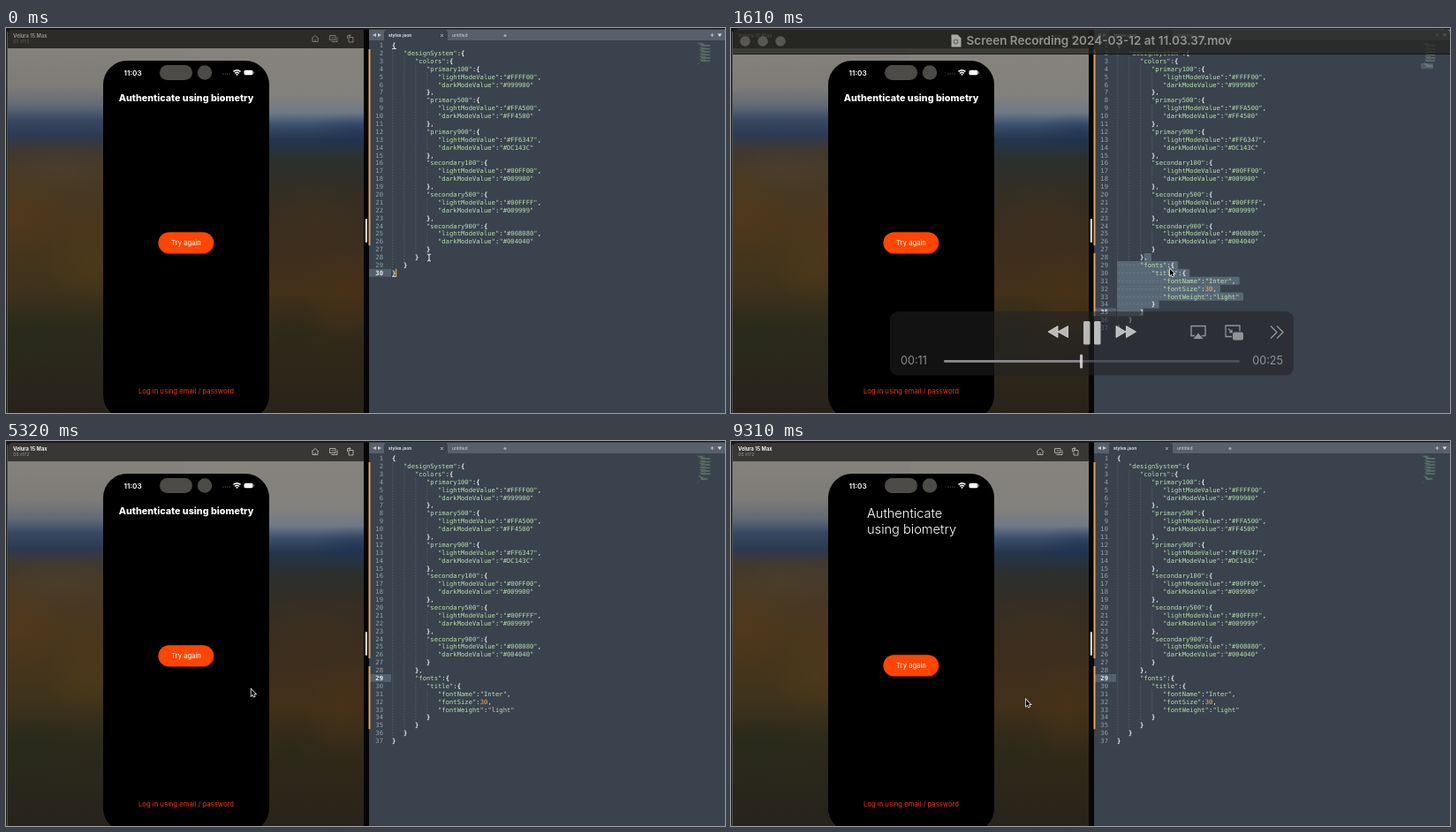
Animation of 814x436 px, one loop 9380 ms. Source, as an HTML page with a canvas:

```html
<!DOCTYPE html>
<html lang="en">
<head>
<meta charset="utf-8">
<title>Design tokens demo</title>
<style>
  html, body { margin: 0; width: 100%; height: 100%; overflow: hidden; background: #191917; }
  canvas { display: block; }
</style>
</head>
<body>
<canvas id="stage" width="814" height="436"></canvas>
<script>
const ctx = document.getElementById('stage').getContext('2d', { alpha: false });
const LOOP = 9380, STEP = 70;
const SANS = 'Inter, sans-serif', MONO = '"DejaVu Sans Mono", monospace';
const CHAR = 4.335, LINE = 8.89, CODE_X = 437, CODE_Y = 19.5;

// Times of the hard changes and fades, in ms
const PASTE = 420, DESELECT = 2170, FOCUS_SIMULATOR = 4340, RELOAD = 8190;
const OVERLAY = { from: 490, shown: 700, fade: 1500, gone: 1900 };
const MOUSE = [
  [0, 479, 260], [1190, 480, 262], [1610, 498, 274], [2240, 498, 271], [2660, 470, 271], [3430, 314, 267],
  [4200, 314, 267], [5250, 278, 282], [5880, 296, 291], [6440, 332, 297], [7560, 335, 294]
];

// ---------- helpers ----------
const clamp = v => Math.max(0, Math.min(1, v));
const ramp = (t, a, b) => clamp((t - a) / (b - a));
const ease = v => v * v * (3 - 2 * v);

function rect(x, y, w, h, color, radius = 0) {
  ctx.fillStyle = color;
  ctx.beginPath();
  ctx.roundRect(x, y, w, h, radius);
  ctx.fill();
}
function disc(x, y, r, color) {
  ctx.fillStyle = color;
  ctx.beginPath();
  ctx.arc(x, y, r, 0, 7);
  ctx.fill();
}
function text(str, x, y, font, color, align = 'left') {
  ctx.font = font;
  ctx.fillStyle = color;
  ctx.textAlign = align;
  ctx.fillText(str, x, y);
}
function path(d, x, y, stroke, width = 1, fill) {
  const p = new Path2D(d);
  ctx.save();
  ctx.translate(x, y);
  if (stroke) { ctx.strokeStyle = stroke; ctx.lineWidth = width; ctx.stroke(p); }
  if (fill) { ctx.fillStyle = fill; ctx.fill(p); }
  ctx.restore();
}
function mousePosition(t) {
  const next = MOUSE.findIndex(k => k[0] > t);
  if (next < 0) return MOUSE.at(-1).slice(1);
  const [t0, x0, y0] = MOUSE[next - 1], [t1, x1, y1] = MOUSE[next];
  const k = ease((t - t0) / (t1 - t0));
  return [x0 + (x1 - x0) * k, y0 + (y1 - y0) * k];
}

// ---------- code ----------
const indent = (depth, str) => ' '.repeat(depth * 3) + str;
const PALETTE = [
  ['primary100', '#FFFF00', '#999900'], ['primary500', '#FFA500', '#FF4500'], ['primary900', '#FF6347', '#DC143C'],
  ['secondary100', '#00FF00', '#009900'], ['secondary500', '#00FFFF', '#009999'], ['secondary900', '#008080', '#004040']
];
const HEAD = [
  '{', indent(1, '"designSystem":{'), indent(2, '"colors":{'),
  ...PALETTE.flatMap(([name, light, dark], i) => [
    indent(3, `"${name}":{`), indent(4, `"lightModeValue":"${light}",`),
    indent(4, `"darkModeValue":"${dark}"`), indent(3, i < 5 ? '},' : '}')
  ])
];
const TAIL = [indent(1, '}'), '}'];
const BEFORE = [...HEAD, indent(2, '}'), ...TAIL];
const AFTER = [
  ...HEAD, indent(2, '},'), indent(2, '"fonts":{'), indent(3, '"title":{'),
  indent(4, '"fontName":"Inter",'), indent(4, '"fontSize":30,'), indent(4, '"fontWeight":"light"'),
  indent(3, '}'), indent(2, '}'), ...TAIL
];
const rowTop = line => CODE_Y + (line - 1) * LINE - LINE / 2;
const depthOf = line => line.search(/\S/);

function drawToken(token, x, y) {
  const brace = /[{}]/.test(token);
  const color = token[0] === '"' ? '#bbdfb1' : /\d/.test(token) ? '#f3ae62' : '#f2f4f5';
  text(token, x, y, `${brace ? 'bold ' : ''}7.2px ${MONO}`, color);
}
function drawSelection(lines) {
  for (let n = 28; n <= 35; n++) {
    const from = n === 28 ? 467.5 : CODE_X;
    const end = CODE_X + (lines[n - 1].length + (n < 35 ? 1 : 0)) * CHAR;
    rect(from, rowTop(n), end - from, LINE + .2, '#596876', 1.5);
    if (n > 28) text('·'.repeat(depthOf(lines[n - 1])), CODE_X, rowTop(n) + 7, `7.2px ${MONO}`, '#7c8994');
  }
}
function drawMinimap(lines, selected) {
  lines.forEach((line, i) => {
    const start = depthOf(line), y = 16 + i * .86;
    rect(782 + start * .4, y, (line.length - start) * .4, .55, '#8fb69099');
    if (selected && i > 27 && i < 35) rect(781, y, 14, .86, '#8d9aa655');
  });
}
function drawEditor(t) {
  const pasted = t >= PASTE, selected = pasted && t < DESELECT;
  const lines = pasted ? AFTER : BEFORE;
  const active = !pasted ? 30 : selected ? 35 : 29;

  rect(411, 1, 403, 435, '#39424d');
  rect(411, 2, 403, 12, '#58616b');
  rect(428, 2, 72, 13, '#39424d', [3, 3, 0, 0]);
  path('M4 -2L0 0L4 2ZM6 -2L10 0L6 2Z', 415, 8, null, 1, '#c5cacf');
  text('styles.json', 433, 10, `600 5px ${SANS}`, '#eef0f2');
  text('untitled', 505, 10, `5px ${SANS}`, '#d3d7db');
  path('M-1.5 -1.5L1.5 1.5M1.5 -1.5L-1.5 1.5', 493.5, 8.5, '#cbd0d5', .8);
  disc(565, 8.5, 1.6, '#a0a7ae');
  path('M-2 0H2M0 -2V2', 799.5, 8, '#c9cdd2', .8);
  path('M-2.5 -1.5H2.5L0 2Z', 808, 8, null, 1, '#d9dde1');

  rect(411, rowTop(active), 25, LINE, '#53606d');
  rect(410.5, rowTop(2), 2, LINE * 25, '#e2a35c');
  if (pasted) rect(410.5, rowTop(28), 2, LINE * 8, '#e2a35c');
  if (selected) drawSelection(lines);

  lines.forEach((line, i) => {
    const n = i + 1, y = rowTop(n) + 7.05, start = depthOf(line);
    text(n, 427, y, `${n === active ? 'bold ' : ''}7.2px ${MONO}`, n === active ? '#e9edf0' : '#99a3ad', 'right');
    for (let c = 0; c < start; c += 3)
      for (let dy = 0; dy < 8; dy += 3) rect(CODE_X + .5 + c * CHAR, rowTop(n) + dy, .7, 1.5, '#606d79');
    for (const m of line.matchAll(/"[^"]*"|\d+|[{}]|[:,]/g)) drawToken(m[0], CODE_X + m.index * CHAR, y);
  });

  if (t < FOCUS_SIMULATOR && !selected) {
    const brackets = pasted ? [[498, 29], [463, 35]] : [[437, 1], [437, 30]];
    brackets.forEach(([x, n]) => rect(x, rowTop(n) + 8, 5, .9, '#dce1e5'));
    rect(pasted ? 498 : 441, rowTop(active), 1.2, LINE, '#f5a552');
  }
  drawMinimap(lines, selected);
}

// ---------- simulator ----------
function verticalWash(x, w, stops) {
  const g = ctx.createLinearGradient(0, 23, 0, 436);
  stops.forEach(([y, color]) => g.addColorStop((y - 23) / 413, color));
  ctx.fillStyle = g;
  ctx.fillRect(x, 23, w, 413);
}
function glow(x, y, rx, ry, rgb, alpha) {
  ctx.save();
  ctx.translate(x, y);
  ctx.scale(rx, ry);
  const g = ctx.createRadialGradient(0, 0, 0, 0, 0, 1);
  g.addColorStop(0, `rgba(${rgb},${alpha})`);
  g.addColorStop(1, `rgba(${rgb},0)`);
  ctx.fillStyle = g;
  ctx.fillRect(-1, -1, 2, 2);
  ctx.restore();
}
function drawWallpaper() {
  ctx.save();
  ctx.beginPath();
  ctx.rect(2, 23, 403, 413);
  ctx.clip();
  verticalWash(2, 200, [[23, '#85827b'], [66, '#7e7c78'], [88, '#626a76'], [104, '#384862'], [122, '#2c3a50'],
    [140, '#41392f'], [160, '#463a28'], [220, '#4a361d'], [290, '#40331b'], [340, '#2c2a1b'], [436, '#27231b']]);
  verticalWash(202, 203, [[23, '#86837d'], [76, '#83817d'], [96, '#6f7986'], [110, '#3c4f6b'], [126, '#23364e'],
    [148, '#2b302f'], [180, '#332e25'], [235, '#3c2e1e'], [300, '#423019'], [360, '#302919'], [436, '#28241a']]);
  glow(10, 205, 60, 55, '92,60,22', .35);
  glow(60, 160, 60, 28, '84,70,44', .3);
  glow(95, 265, 50, 50, '88,64,24', .4);
  glow(30, 350, 70, 45, '38,42,28', .5);
  glow(395, 118, 50, 22, '22,44,78', .4);
  glow(350, 215, 50, 40, '72,52,30', .3);
  glow(380, 300, 45, 55, '84,54,22', .3);
  glow(320, 350, 50, 50, '36,40,26', .45);
  ctx.restore();
}
function drawPhone(t) {
  rect(110, 37, 188, 406, '#000', 27);
  text('11:03', 133.5, 53.6, `600 8.2px ${SANS}`, '#fff');
  rect(174, 42, 37, 17, '#4c4b47', 8.5);
  disc(225, 50.5, 8.2, '#4c4b47');
  for (let i = 0; i < 4; i++) disc(246 + i * 2.4, 52, .6, '#777');
  path('M-4 -1.6Q0 -5 4 -1.6M-2.4 .4Q0 -1.8 2.4 .4', 261.5, 51, '#fff', 1.4);
  disc(261.5, 52.7, 1, '#fff');
  rect(269.5, 47.8, 10, 5.4, '#fff', 1.6);
  rect(280.2, 49.5, .9, 2, '#999');

  const reloaded = t >= RELOAD;
  if (reloaded) {
    text('Authenticate', 154, 87, `300 14.6px ${SANS}`, '#fff');
    text('using biometry', 154, 104.5, `300 14.6px ${SANS}`, '#fff');
  } else {
    text('Authenticate using biometry', 204, 82.8, `800 10.75px ${SANS}`, '#fff', 'center');
  }
  const top = reloaded ? 242.3 : 231.3;
  rect(172.5, top + .5, 63.5, 24.5, '#4a1808', 12.25);
  rect(172.5, top, 62.5, 24, '#fe4602', 12);
  text('Try again', 204, top + 15, `7.7px ${SANS}`, '#fff', 'center');
  text('Log in using email / password', 204, 413.6, `7.7px ${SANS}`, '#f4361a', 'center');
}
function drawSimulator(t) {
  const focused = t >= FOCUS_SIMULATOR;
  drawWallpaper();
  rect(2, 2, 403, 21, focused ? '#383735' : '#2d2b27', [5, 0, 0, 0]);
  text('Velura 15 Max', 8, 11.3, `700 5.7px ${SANS}`, focused ? '#f0f0f0' : '#8e8c87');
  text('OS v17.2', 8, 17.3, `4.6px ${SANS}`, focused ? '#a5a4a0' : '#6b6964');
  const icon = focused ? '#b8b7b4' : '#84827d';
  path('M-4 0L0 -3.5L4 0M-3 -.5V3.5H3V-.5M0 3.5V1', 350, 12, icon, .9);
  path('M-4 -3.5H2.5V1.5H-4ZM-2 3.5H4.5V-1.5M-2 -1H1', 370.5, 12, icon, .9);
  path('M-2 -1.5H3V4H-2ZM-3.5 0V-3.5H0M-1.5 -5L0 -3.5L-1.5 -2', 390, 12, icon, .9);
  drawPhone(t);
}

// ---------- player overlay ----------
function drawOverlay(t) {
  const alpha = ramp(t, OVERLAY.from, OVERLAY.shown) * (1 - ease(ramp(t, OVERLAY.fade, OVERLAY.gone)));
  if (!alpha) return;
  ctx.save();
  ctx.globalAlpha = alpha;

  rect(2, 1, 812, 28.5, 'rgba(37,36,33,.92)', [6, 6, 0, 0]);
  rect(8, 1, 800, .8, '#5a5955');
  rect(2, 29, 812, 1, '#11110f');
  [16, 36, 56].forEach(x => disc(x, 15, 5.8, '#63625f'));
  path('M-5 -7H2L6 -3V7H-5Z', 254.5, 14.5, null, 1, '#c6c6c4');
  disc(254.5, 15.5, 3, '#666');
  disc(254.5, 15.5, 1.3, '#c6c6c4');
  text('Screen Recording 2024-03-12 at 11.03.37.mov', 266.5, 19.3, `600 13.5px ${SANS}`, '#aaa9a6');

  rect(180, 321, 457, 72.5, 'rgba(34,35,36,.66)', 9);
  const light = '#dadada', dim = '#a8aaac';
  path('M0 0L11 -6.5V6.5ZM11 0L22.5 -6.5V6.5Z', 359, 344, light, 1, light);
  path('M0 -6.5L11 0L0 6.5ZM11.5 -6.5L22.5 0L11.5 6.5Z', 436, 344, light, 1, light);
  rect(399, 332, 7.5, 26.5, light, 1.5);
  rect(411, 332, 7.5, 26.5, light, 1.5);
  path('M-4 4H-8V-7H8V4H4', 529, 344.5, dim, 1.4);
  path('M0 1L5.5 7.5H-5.5Z', 529, 344.5, null, 1, dim);
  path('M-2 5H-9V-7.5H7V-1M-6 -4L-2 0M-2 -3V0H-5', 569, 344.5, dim, 1.3);
  rect(568, 344.5, 12, 9, dim, 2);
  path('M-7 -7L0 0L-7 7M0 -7L7 0L0 7', 618, 344.5, dim, 1.4);

  const seconds = 10 + t / 1000, head = 241 + seconds / 25 * 335;
  const timeFont = `12.6px ${SANS}`;
  text('00:' + Math.floor(seconds), 192, 381.3, timeFont, dim);
  text('00:25', 625, 381.3, timeFont, dim, 'right');
  rect(241, 376, 335, 2.8, '#55585b', 1.4);
  rect(241, 376, head - 241, 2.8, '#98999a', 1.4);
  rect(head - 1.6, 369.5, 3.2, 16, '#e6e6e6', 1.5);
  ctx.restore();
}

function drawMouse(t) {
  const [x, y] = mousePosition(t);
  if (t < PASTE) {
    path('M-2 -4Q0 -4 0 -2.5Q0 -4 2 -4M0 -3V3M-2 4Q0 4 0 2.5Q0 4 2 4', x, y, '#f2f2f2', 1);
    return;
  }
  ctx.globalAlpha = t > 7560 && t < 7900 ? .7 : 1;
  path('M0 0V7.2L1.7 5.7L2.8 8.2L4 7.7L2.9 5.3H5Z', x - 1, y - 1, '#f4f4f4', 1.5, '#000');
  ctx.globalAlpha = 1;
}

function render(t) {
  rect(0, 0, 814, 436, '#191917');
  rect(1, 4, 1, 432, '#55544f');
  drawSimulator(t);
  rect(405, 2, 6, 434, '#060606');
  rect(406.7, 216, 2.3, 27, '#cfcfcd', 1);
  drawEditor(t);
  drawMouse(t);
  drawOverlay(t);
}
const origin = performance.now();
function tick() {
  const t = Math.max(0, performance.now() - origin) % LOOP;
  render(Math.floor(t / STEP) * STEP);
  requestAnimationFrame(tick);
}
tick();
</script>
</body>
</html>
```
